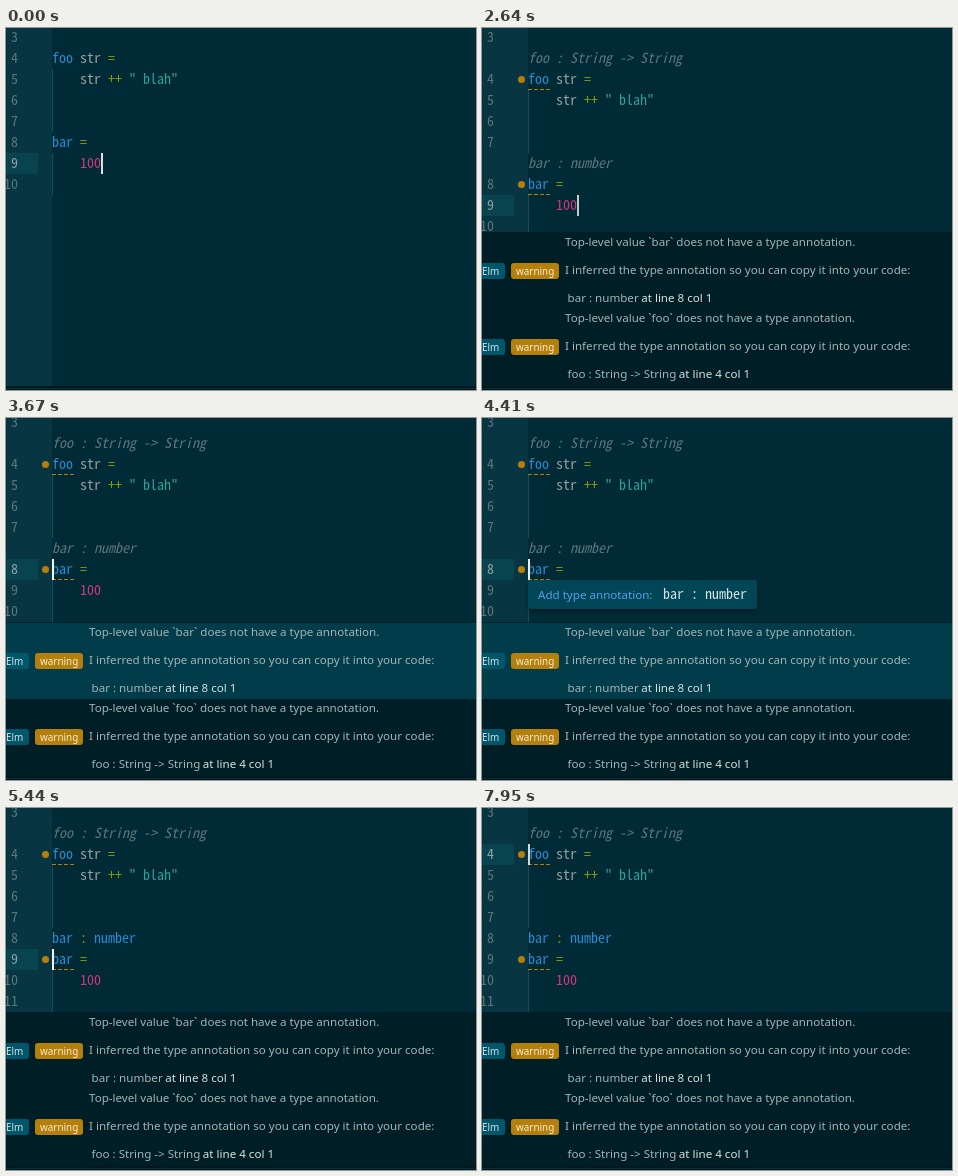
An HTML page with a canvas for the animation above (8000 ms loop, 470 by 362 pixels).

```html
<!DOCTYPE html>
<html lang="en">
<head>
<meta charset="utf-8">
<title>Type annotation helper</title>
<style>
  html, body { margin: 0; width: 100%; height: 100%; overflow: hidden; background: #002b36; }
  canvas { display: block; }
</style>
</head>
<body>
<canvas id="stage" width="470" height="362"></canvas>
<script>
const ctx = document.getElementById('stage').getContext('2d');

const LOOP = 8000, ROW = 21, CHAR = 7, LEFT = 46;
const UI = '11.6px "Noto Sans", sans-serif';
const BADGE = '9.9px "Noto Sans", sans-serif';
const CODE = codeFont('"Noto Sans Mono CJK JP", "Noto Sans Mono", monospace');
const BLUE = '#268bd2', GREY = '#93a1a1', GREEN = '#859900', CYAN = '#2aa198',
      PINK = '#d33682', DIM = '#5c757c', ORANGE = '#b57f0c',
      PALE = '#a3b4b7', BRIGHT = '#d8e2e2';

// Moments (ms) at which the editor state switches
const LINTED = 1740, SCROLLED = 3200, ENTRY_ON = 3660, POPUP_ON = 4110,
      POPUP_OFF = 5130, INSERTED = 5280, ENTRY_OFF = 5430;

// Cursor moves: time, line, column. Each one restarts the blink.
const MOVES = [
  [-985, 9, 7], [3200, 8, 5], [3370, 8, 0], [5280, 9, 0], [5580, 8, 0],
  [5880, 7, 0], [5960, 6, 0], [6030, 5, 0], [6180, 4, 0]
];
const BLINK = 400, FADE = 260;

// Picks the font size whose characters advance by exactly one column.
function codeFont(family) {
  ctx.font = '100px ' + family;
  return (100 * CHAR / ctx.measureText('0').width) + 'px ' + family;
}

function rect(x, y, w, h, color) {
  ctx.fillStyle = color;
  ctx.fillRect(x, y, w, h);
}

function roundRect(x, y, w, h, r, color) {
  ctx.fillStyle = color;
  ctx.beginPath();
  ctx.roundRect(x, y, w, h, r);
  ctx.fill();
}

// Draws a string and returns its width.
function text(str, x, y, color, font = UI, align = 'left') {
  ctx.font = font;
  ctx.textAlign = align;
  ctx.fillStyle = color;
  ctx.fillText(str, x, y);
  return ctx.measureText(str).width;
}

// Rows from top to bottom; a row without `code` is an inferred type hint.
function editorRows(t) {
  const linted = t >= LINTED, inserted = t >= INSERTED;
  const rows = [{ code: [] }];
  if (linted) rows.push({ hint: 'foo : String -> String' });
  rows.push(
    { code: [[0, 'foo', BLUE], [4, 'str', GREY], [8, '=', GREEN]], lint: linted },
    { code: [[4, 'str', GREY], [8, '++', GREEN], [11, '" blah"', CYAN]], guide: true },
    { code: [], guide: true },
    { code: [], guide: true }
  );
  if (inserted) rows.push({ code: [[0, 'bar', BLUE], [4, ':', GREEN], [6, 'number', BLUE]] });
  else if (linted) rows.push({ hint: 'bar : number' });
  rows.push(
    { code: [[0, 'bar', BLUE], [4, '=', GREEN]], lint: linted },
    { code: [[4, '100', PINK]], guide: true },
    { code: [], guide: true }
  );
  return rows;
}

function cursorAt(t) {
  const [start, line, col] = MOVES.filter(m => m[0] <= t).pop();
  const beat = Math.floor((t - start) / BLINK);
  const p = Math.min(1, (t - start) % BLINK / FADE);
  const eased = 1 - (1 - p) ** 2;
  const alpha = beat === 0 ? 1 : beat % 2 ? 1 - eased : eased;
  return { line, col, alpha: Math.max(0.08, alpha) };
}

function drawLintMarks(y) {
  ctx.fillStyle = ORANGE;
  ctx.beginPath();
  ctx.arc(39.5, y + 10.5, 3.5, 0, 2 * Math.PI);
  ctx.fill();
  for (let x = LEFT; x < LEFT + 22; x += 6) rect(x, y + 20, 4, 1, ORANGE);
}

function drawEditor(t) {
  rect(0, 0, 470, 362, '#002b36');
  rect(0, 0, LEFT, 358, '#073642');
  const cursor = cursorAt(t);
  let y = t >= SCROLLED ? -6 : -1;
  let line = 3;
  for (const row of editorRows(t)) {
    if (row.hint) {
      text(row.hint, LEFT, y + 15, DIM, 'italic ' + CODE);
    } else {
      const current = line === cursor.line;
      if (current) rect(0, y, 32, ROW, '#084350');
      if (row.guide) rect(LEFT, y, 1, ROW, '#0f505c');
      text(line, 12, y + 15, current ? GREY : DIM, CODE, 'right');
      for (const [col, str, color] of row.code) text(str, LEFT + col * CHAR, y + 15, color, CODE);
      if (row.lint) drawLintMarks(y);
      if (current) {
        ctx.globalAlpha = cursor.alpha;
        rect(LEFT + cursor.col * CHAR, y, 2, ROW, '#f2f2ec');
        ctx.globalAlpha = 1;
      }
      line++;
    }
    y += ROW;
  }
}

function drawEntry(y, name, type, place) {
  text('Top-level value `' + name + '` does not have a type annotation.', 83, y + 14, PALE);
  roundRect(-6, y + 31, 29, 16, 3, '#00566a');
  text('Elm', 0, y + 43, BRIGHT, BADGE);
  roundRect(29, y + 31, 48, 16, 3, ORANGE);
  text('warning', 34, y + 43, '#f5ecd8', BADGE);
  text('I inferred the type annotation so you can copy it into your code:', 83, y + 42, PALE);
  const width = text(name + ' : ' + type, 85.5, y + 70, PALE);
  text(place, 88 + width, y + 70, BRIGHT);
}

function drawPanel(t) {
  rect(0, 204, 470, 154, '#001e26');
  if (t >= ENTRY_ON && t < ENTRY_OFF) rect(0, 205, 470, 76, '#003c49');
  drawEntry(204, 'bar', 'number', 'at line 8 col 1');
  drawEntry(280, 'foo', 'String -> String', 'at line 4 col 1');
}

function drawPopup() {
  ctx.save();
  ctx.shadowColor = 'rgba(0, 0, 0, .4)';
  ctx.shadowBlur = 5;
  ctx.shadowOffsetY = 2;
  roundRect(46, 162, 229, 29, 3, '#004657');
  ctx.restore();
  text('Add type annotation:', 56, 181, '#5a9bea');
  text('bar : number', 181, 181, BRIGHT, CODE);
}

function frame(now) {
  const t = now % LOOP;
  drawEditor(t);
  if (t >= LINTED) drawPanel(t);
  if (t >= POPUP_ON && t < POPUP_OFF) drawPopup();
  rect(0, 358, 470, 4, '#001920');
  rect(0, 360, 470, 1, '#04303a');
  requestAnimationFrame(frame);
}
requestAnimationFrame(frame);
</script>
</body>
</html>
```
